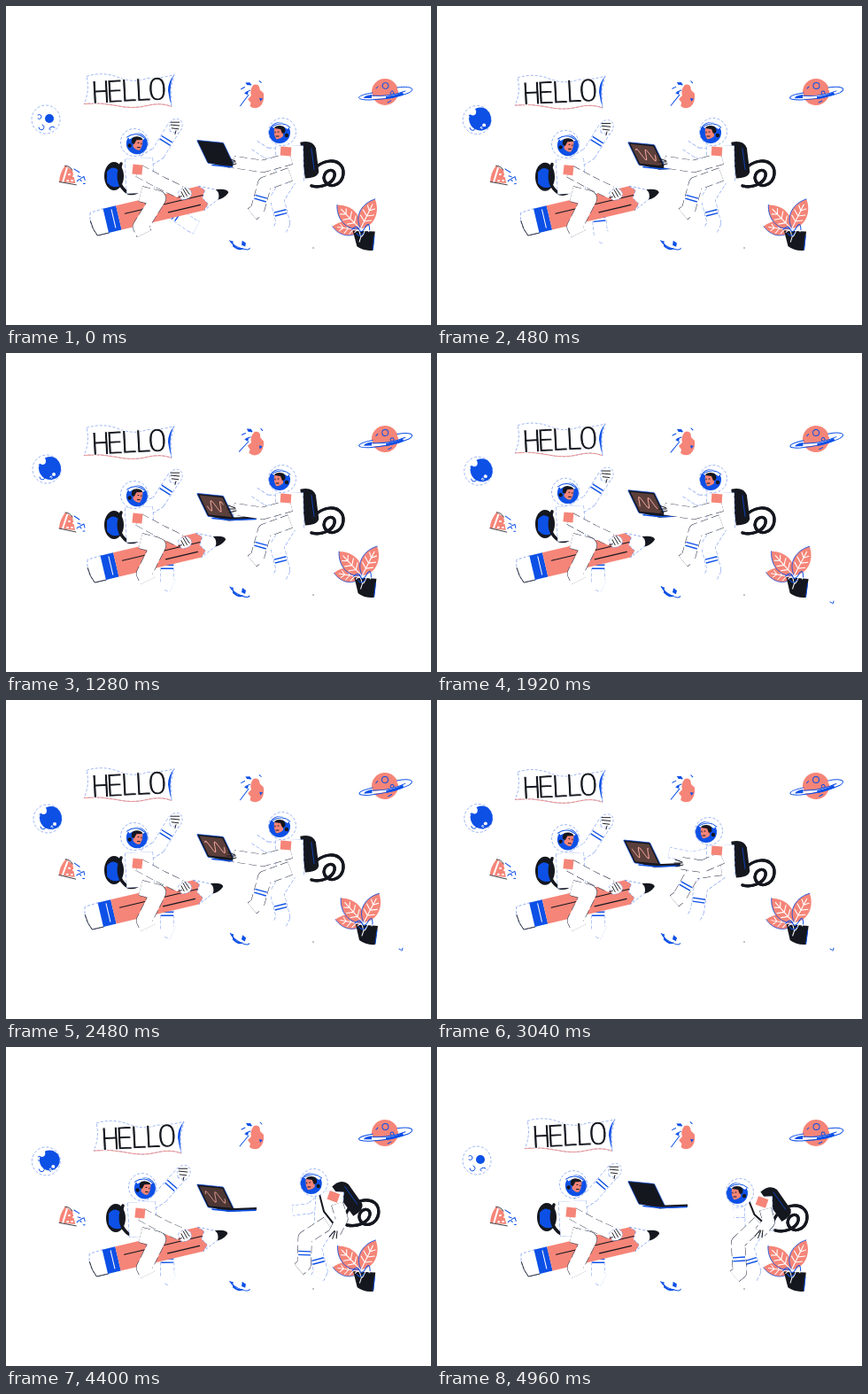
Write an HTML page that moves like this. It is 480x360 px and loops after 5040 ms.

```html
<!DOCTYPE html>
<html lang="en">
<head>
<meta charset="utf-8">
<title>Hello from space</title>
<style>
html, body { margin: 0; width: 100%; height: 100%; overflow: hidden; background: #fff; }
svg { display: block; width: 100vw; height: 100vh; }
.coral { fill: #f58578; }
.blue { fill: #0d50e6; }
.ink { fill: #15171f; }
.white { fill: #fff; }
.lb, .li, .lw { fill: none; stroke-width: 1; stroke-linecap: round; stroke-linejoin: round; }
.lb { stroke: #0d50e6; }
.li { stroke: #15171f; }
.lw { stroke: #fff; }
.edge { fill: #fff; stroke: #5b84ec; stroke-width: .6; stroke-dasharray: 3 2; }
.limb path { fill: none; stroke-linejoin: round; }
.limb .rim { stroke: #6f93ee; stroke-dasharray: 4 2; }
.limb.dark .rim { stroke: #2a2f45; stroke-dasharray: 9 4; }
.limb .core { stroke: #fff; }
.limb .cuff { stroke: #0d50e6; stroke-width: 1.4; }
/* the white stroke slims the letters */
text { font: 36px "Noto Sans Mono", monospace; letter-spacing: -5.6px; fill: #15171f; stroke: #fff; stroke-width: 1; }
</style>
</head>
<body>
<svg viewBox="0 0 480 360">
<defs>
  <g id="head">
    <circle r="15.5" class="edge"/>
    <ellipse cx="3" cy="1" rx="12" ry="12" class="blue"/>
    <path class="white" d="M-9-7Q2-15 12-6L9-4Q2-9-6-3Z"/>
    <path class="coral" d="M-1-4Q4-8 9-4Q10 3 7 8Q3 9-1 5Z"/>
    <path class="ink" d="M-3 1Q-5-7 3-7Q8-7 9-4L2-3L0 2Z"/>
    <path class="li" d="M4 0h1M8 0v1M4 5h3"/>
    <path class="lb" d="M-9-5Q0-13 11-6"/>
    <circle cx="-5" cy="4" r="2.2" class="ink"/>
  </g>
  <g id="glove">
    <path class="edge" d="M-6 7Q-8-4-3-7Q5-10 8-4Q10 3 4 9Z"/>
    <path class="li" d="M-5-4L5-4M-5-1L5 0M-4 3L4 4M1 6l-1 4"/>
  </g>
  <g id="leaf">
    <path class="coral" d="M0 0C-12-8-10-24 0-33C10-24 12-8 0 0Z"/>
    <path class="lb" style="stroke-width:.7" d="M0 0C-12-8-10-24 0-33"/>
    <path class="lw" d="M0 0V-27M0-8l-6-4M0-8l6-4M0-14l-6-4M0-14l6-4M0-20l-4-4M0-20l4-4"/>
  </g>
  <clipPath id="disc"><circle r="16"/></clipPath>
</defs>

<g id="moon">
  <circle r="16" class="edge"/>
  <g clip-path="url(#disc)">
    <circle id="shade" cx="4" cy="-1" class="blue"/>
    <g class="white"><circle cx="8" cy="6" r="2"/><circle cx="-5" cy="-9" r="4"/><circle cx="5" cy="9" r="1.5"/></g>
  </g>
  <path class="lb" d="M-9-5a2.5 2.5 0 1 1 0 4M-8 9a3 3 0 1 0 4-3M5 12a3 2 0 0 1 5-3"/>
</g>

<g id="pizza">
  <path class="coral" d="M-8-11Q-15-2-15 7L3 9L0-6Z"/>
  <path class="lw" style="stroke-width:2" d="M-6-8L-11 7M-4-1h1M-6 6h1M1 1h1M-1 6h1"/>
  <path class="li" style="stroke-width:.8" d="M-8-11Q-3-11 0-6M-15 7L4 11"/>
  <path class="lb" d="M2-7L8-3M6 1l3 1M5 7q3-4 5 0M9 4l4-2l1 4M12 10h2"/>
</g>

<g id="snack">
  <path class="coral" d="M1-12Q8-14 8-6L12-2Q13 8 7 13Q1 16-4 12L-3 8L-6 4L-2 0Q-4-6 1-12Z"/>
  <path class="lb" d="M-15 11l10-12M-13-8l4-2M-6-13l4 1M8-16l2 2M-8-4l5-2"/>
  <path class="blue" d="M-10-3l5-2l-1 4ZM-8-15l5 0l2 3l-5 0ZM7 3l4 1l-3 3Z"/>
</g>

<g id="saturn">
  <circle r="15" class="coral"/>
  <path class="lb" d="M-3-7a3.5 3.5 0 1 0 7 0a3.5 3.5 0 1 0-7 0M8-1a2 2 0 1 0 .1 0M-10-4l2-2M3 12l4-2"/>
  <path class="white" d="M-14 2C-30 5-32 10-18 8Q10 8 27 1C36-4 28-6 14-5L14-2Q25-3 24-1Q8 5-14 5Z"/>
  <path class="lb" d="M-14 1C-34 4-34 9-18 9Q10 8 27 1C36-4 28-7 14-5M-15 4Q4 6 23-1"/>
  <path class="blue" d="M-15 3Q-24 4-24 7L-15 7ZM1 5Q12 4 20 0L21 3Q12 7 1 8Z"/>
</g>

<g id="minor">
  <path class="blue" d="M-8-3Q-4 6 4 4Q2 8-4 5L-8 2ZM3-4l4 3l-1 4l-4-2ZM-11-5l4 1l-1 3Z"/>
  <path class="lb" d="M-11-5Q-8 1 2 5Q10 8 11 5"/>
</g>

<g id="plant">
  <use href="#leaf" transform="translate(-4-9)rotate(-80)scale(.95)"/>
  <use href="#leaf" transform="translate(-4-11)rotate(-42)scale(1.12)"/>
  <use href="#leaf" transform="translate(-3-11)rotate(28)scale(1.12)"/>
  <path class="ink" d="M-12-9L13-7L10 14Q0 15-8 9Z"/>
  <path class="lw" d="M-10-7q5-5 6 2t5-2t5 0M-3-2l-2 6"/>
  <path class="lb" d="M-13-10q6-6 8 0t7-2t5 3M-8-6q3 6 8 0M12-2l-2 15"/>
</g>
<circle cx="347" cy="273" r=".8" fill="#777"/>
<path id="spark" class="lb" d="M444 281l2 1M447 283l1-3"/>

<g id="banner">
  <path class="edge" d="M-48-16Q-30-22-12-15T20-14Q38-14 51-18L47-2L48 18Q36 13 20 17T-14 17T-51 15Q-44 0-48-16Z"/>
  <path d="M48 18Q36 13 20 17T-14 17T-51 15" fill="none" stroke="#f58578" stroke-width=".8"/>
  <path class="blue" d="M51-18Q44-6 48 18Q45 8 44 0Q44-10 51-18Z"/>
  <text x="-3" y="12.5" text-anchor="middle" transform="rotate(-3)">HELLO</text>
</g>

<g id="packL">
  <ellipse cx="-2" cy="-1" rx="11" ry="16" class="ink"/>
  <path class="blue" d="M-10-6Q-4-14 3-8L5 10Q-4 14-10 6Z"/>
  <path class="li" style="stroke-width:3.5" d="M6-15Q-2 8 14 18Q22 20 28 14"/>
</g>
<g id="backLegL" class="limb" data-w="15" data-cuff=".35"></g>
<g id="pencil">
  <path class="edge" d="M-156-13Q-161 0-154 14L-140 14V-14Z"/>
  <path class="li" style="stroke-width:.8" d="M-158-4Q-158 6-154 14L-141 14"/>
  <path class="blue" d="M-141-14H-126V14H-141Z"/>
  <path class="lw" d="M-132-11V10"/>
  <path class="coral" d="M-126-14H-30L-24-8L-29 0L-24 8L-30 14H-126Z"/>
  <path class="edge" d="M-30-14L0 0L-30 14L-24 8L-29 0L-24-8Z"/>
  <path class="ink" d="M-12-6Q2-4 1 1Q-5 6-12 6Q-8 0-12-6Z"/>
  <path class="li" style="stroke-width:1.2" d="M-118-3H-28M-70 7H-33"/>
</g>
<g id="waveL" class="limb" data-w="15" data-cuff=".4"></g>
<g id="trunkL" class="limb" data-w="31"></g>
<g id="legL" class="limb dark" data-w="17"></g>
<g id="armL" class="limb dark" data-w="14"></g>
<rect id="patchL" class="coral" x="-5" y="-5" width="11" height="11"/>
<use id="gripL" href="#glove"/>
<use id="palmL" href="#glove"/>
<use id="headL" href="#head"/>

<g id="hose" fill="none" stroke-linecap="round">
  <path id="coil" d="M-22 4C-12-18 16-18 16 0C16 16-4 20-6 6C-6-4 8-6 6 4C4 12-8 18-20 15" stroke="#15171f" stroke-width="3.2"/>
  <use href="#coil" style="stroke:#0d50e6"/>
</g>
<g id="packR">
  <path class="ink" d="M-8-20Q6-22 9-12L10 15Q8 22-6 21Z"/>
  <path class="lb" style="stroke-width:.7" d="M4-12L5 12"/>
</g>
<g id="laptop">
  <g transform="matrix(1 .1 .48 1 0 0)">
    <rect x="-1" y="-26" width="30" height="26" rx="1" class="ink" stroke="#0d50e6" stroke-width=".6"/>
    <rect id="screen" x="1" y="-24" width="26" height="22"/>
    <polyline id="wave" fill="none" stroke="#f5a79c"/>
  </g>
  <path class="ink" d="M-1-1L29 1L54 0V3L22 5Z"/>
  <path class="lb" style="stroke-width:1.6" d="M4 2L24 4L53 3"/>
</g>
<g id="farArmR" class="limb" data-w="11"></g>
<g id="farLegR" class="limb" data-w="15" data-cuff=".5"></g>
<g id="trunkR" class="limb" data-w="31"></g>
<g id="legR" class="limb dark" data-w="15" data-cuff=".5"></g>
<path id="strapR" class="li" style="stroke-width:2"/>
<g id="armR" class="limb dark" data-w="13"></g>
<rect id="patchR" class="coral" x="-6" y="-5" width="12" height="10"/>
<path id="fingersR" class="li" d="M-6-4L2-1M-7 0H2M-5 4L3 2"/>
<use id="headR" href="#head"/>
</svg>

<script>
const LOOP = 5040, STEP = 80;

// The three poses of the right astronaut; knees and elbows follow from them.
const SIT = { head: [312,142], chest: [320,169], hip: [321,190], hand: [257,176], farHand: [279,156], foot: [284,230], farFoot: [313,245] };
const PUSH = { head: [356,137], chest: [370,165], hip: [362,200], hand: [380,211], farHand: [307,181], foot: [329,234], farFoot: [352,253] };
const STAND = { head: [342,164], chest: [363,180], hip: [364,198], hand: [365,209], farHand: [335,187], foot: [342,254], farFoot: [358,253] };

const $ = id => document.getElementById(id);
const mix = (a, b, f) => a + (b - a) * f;
const add = (p, x, y) => [p[0] + x, p[1] + y];
const lerp = (a, b, f) => [mix(a[0], b[0], f), mix(a[1], b[1], f)];
const line = pts => "M" + pts.map(p => p.map(v => v.toFixed(1)).join(" ")).join("L");
const turn = (t, period) => Math.cos(t / period * 2 * Math.PI);

function ease(t, from, to) {
  const f = Math.min(1, Math.max(0, (t - from) / (to - from)));
  return f * f * (3 - 2 * f);
}

function blend(a, b, f) {
  return Object.fromEntries(Object.keys(a).map(k => [k, lerp(a[k], b[k], f)]));
}

// Joint between a and b, k pixels off the straight line.
function bend(a, b, k) {
  const dx = b[0] - a[0], dy = b[1] - a[1], len = Math.hypot(dx, dy) || 1;
  return add(lerp(a, b, .5), -dy / len * k, dx / len * k);
}

function put(id, [x, y], extra = "") {
  $(id).setAttribute("transform", `translate(${x} ${y}) ${extra}`);
}

for (const g of document.querySelectorAll(".limb")) {
  const w = +g.dataset.w;
  g.innerHTML = `<path class="rim" stroke-width="${w + 1}"/><path class="core" stroke-width="${w}"/><path class="cuff"/>`;
}

// Cuffs are two bands across the second bone.
function limb(id, ...pts) {
  const g = $(id), [rim, core, cuff] = g.children, d = line(pts);
  rim.setAttribute("d", d);
  core.setAttribute("d", d);
  if (!g.dataset.cuff) return;
  const [, a, b] = pts, c = lerp(a, b, +g.dataset.cuff);
  const len = Math.hypot(b[0] - a[0], b[1] - a[1]) || 1;
  const ux = (b[0] - a[0]) / len, uy = (b[1] - a[1]) / len, h = g.dataset.w / 2 - .5;
  const band = s => line([add(c, ux * s - uy * h, uy * s + ux * h), add(c, ux * s + uy * h, uy * s - ux * h)]);
  cuff.setAttribute("d", band(0) + band(4));
}

function drawLeft(t, bob) {
  const carry = ease(t, 3100, 3700);
  const kick = Math.max(0, turn(t, 3760)) ** 6;
  const patch = [148 + 3 * carry, 185 + bob + 2 * carry];
  const palm = [191 + 9 * carry, 137 + 2 * bob + 4 * carry];
  const grip = [202, 212 + bob];
  const heel = lerp([182, 260], [209, 247], kick);
  const foot = [152 + 4 * (1 - kick), 249];
  put("banner", [139 + 11 * carry, 98 + 2.5 * bob + 4 * carry]);
  put("packL", [124 + 2 * carry, 194 + bob]);
  put("pencil", [247 + 3 * turn(t, LOOP), 210], "rotate(-13.3)");
  limb("backLegL", [162, 220], [182, 228], heel, add(heel, 6, 3));
  limb("waveL", add(patch, 8, -8), add(patch, 24, -18), palm);
  limb("trunkL", add(patch, 2, -12), add(patch, 4, 27));
  limb("legL", [152, 212], [172, 217], foot, add(foot, 4, 8));
  limb("armL", add(patch, 2, 2), add(patch, 28, 16), add(grip, -5, -1));
  put("patchL", patch, "rotate(6)");
  put("gripL", grip, "rotate(55) scale(.85)");
  put("palmL", palm, "scale(.95)");
  put("headL", [145 + 9 * carry, 157 + 3 * bob + carry], "rotate(6)");
}

function drawRight(t) {
  const away = ease(t, 3040, 3700), crouch = ease(t, 2480, 3040) * (1 - away);
  const p = blend(blend(SIT, PUSH, away), STAND, ease(t, 3760, 4900));
  p.head = add(p.head, -5 * crouch, 6 * crouch);
  p.chest = add(p.chest, 0, 6 * crouch);
  p.foot = add(p.foot, -10 * crouch, -8 * crouch);
  p.farFoot = add(p.farFoot, -19 * crouch, -7 * crouch);
  p.hand = add(p.hand, 18 * crouch, 8 * crouch);
  p.farHand = add(p.farHand, -17 * crouch, 16 * crouch);

  const { head, chest, hip, hand, farHand, foot, farFoot } = p;
  const patch = add(chest, -4 + 8 * away, -5);
  const arm = add(chest, 2 + 6 * away, 3), farArm = add(chest, -8, -3), farHip = add(hip, 0, 4);
  put("hose", add(patch, 49 - 14 * away, 24 - 7 * away));
  put("packR", add(patch, 26 - 10 * away, 9 - 8 * away), `rotate(${-5 - 28 * away})`);
  limb("farArmR", farArm, bend(farArm, farHand, -5), farHand);
  limb("farLegR", farHip, bend(farHip, farFoot, 11), farFoot, add(farFoot, -4, 8));
  limb("trunkR", add(chest, 0, -11), add(hip, 0, 10));
  limb("legR", hip, bend(hip, foot, 14), foot, add(foot, -6, 5));
  const neck = add(chest, -13, -12), waist = add(hip, 11, 6);
  $("strapR").setAttribute("d", line([neck, bend(neck, waist, 5), waist]));
  $("strapR").setAttribute("opacity", away);
  limb("armR", arm, bend(arm, hand, -7), hand);
  put("patchR", patch, `rotate(${4 + 16 * away})`);
  put("fingersR", hand, `rotate(${-70 * away})`);
  put("headR", head, "scale(-1 1)");
  return crouch;
}

function drawLaptop(t, bob, crouch, lit) {
  put("laptop", [229 - 5 * crouch, 181 + 3.5 * bob + 4 * crouch]);
  $("screen").setAttribute("fill", `rgb(${mix(21, 91, lit)},${mix(23, 63, lit)},${mix(31, 59, lit)})`);
  const pts = [];
  for (let x = 4; x <= 24; x++) pts.push(x + "," + (-13 + 6 * Math.sin(x * .6 + t / 320)).toFixed(1));
  $("wave").setAttribute("points", pts.join(" "));
  $("wave").setAttribute("opacity", lit);
}

function draw(t) {
  const bob = -turn(t, LOOP / 2), drift = -turn(t, LOOP);
  const lit = ease(t, 0, 400) * (1 - ease(t, 4200, 4900));
  put("moon", [46 + drift, 131 + 3 * drift]);
  $("shade").setAttribute("r", mix(5, 13, lit));
  put("pizza", [75, 191], `rotate(${2 * drift})`);
  put("snack", [279, 101], `rotate(${3 * bob})`);
  put("saturn", [428, 97], `rotate(${-2 - 2 * drift})`);
  put("minor", [264, 269], `rotate(${4 * drift})`);
  put("plant", [405.5 + 1.5 * drift, 262], `rotate(${drift - 1})`);
  $("spark").setAttribute("visibility", t >= 1600 && t < 3360 ? "visible" : "hidden");
  drawLeft(t, bob);
  drawLaptop(t, bob, drawRight(t), lit);
}

const start = performance.now();
function tick() {
  const t = (performance.now() - start) % LOOP;
  draw(Math.floor(t / STEP) * STEP);
  requestAnimationFrame(tick);
}
tick();
</script>
</body>
</html>
```
